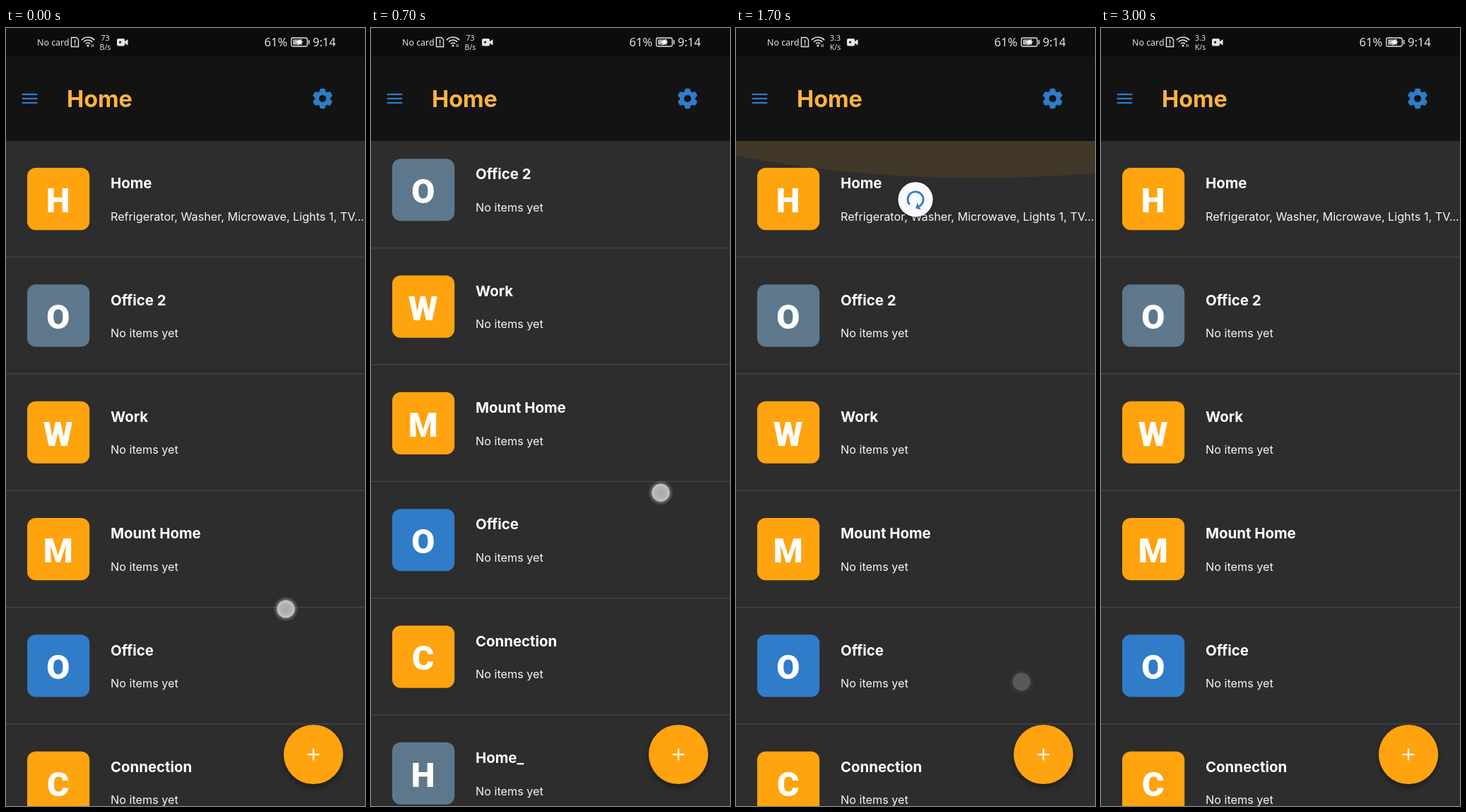
An HTML page with a canvas for the animation above (3100 ms loop, 508 by 1102 pixels).

```html
<!DOCTYPE html>
<html lang="en">
<head>
<meta charset="utf-8">
<title>Room list</title>
<style>
html, body { margin: 0; width: 100%; height: 100%; overflow: hidden; background: #2d2d2d; }
canvas { display: block; width: 508px; height: 1102px; }
</style>
</head>
<body>
<canvas id="stage"></canvas>
<script>
const W = 508, H = 1102, LOOP = 3100, STEP = 100;
const TOP = 160, ROW = 165.33, MAX_SCROLL = 215.3, TAU = Math.PI * 2;
const ORANGE = '#ffa30f', SLATE = '#5d788c', BLUE = '#307cc8', WHITE = '#e4e4e4';
const INTER = 'Inter, sans-serif', NOTO = '"Noto Sans", sans-serif', ROBOTO = 'Roboto, sans-serif';

const rooms = [
  ['Home', ORANGE, 'Refrigerator, Washer, Microwave, Lights 1, TV...'],
  ['Office 2', SLATE], ['Work', ORANGE], ['Mount Home', ORANGE],
  ['Office', BLUE], ['Connection', ORANGE], ['Home_', SLATE]
];

// Three swipes: up to the end, back to the start, then pull to refresh
const swipe = (start, end, from, to) => ({ start, end, from, to });
const up = swipe(0, 230, [396, 823], [456, 387]);
const down = swipe(640, 850, [404, 540], [425, 954]);
const pull = swipe(1250, 1565, [299, 483], [404, 926]);

const LAG = 30, SLOP = 22, FADE = 170;
const SNAP = 150, REFRESHED = 2760, SHRINK = 200;

const canvas = document.getElementById('stage');
const g = canvas.getContext('2d');
const dpr = window.devicePixelRatio || 1;
canvas.width = W * dpr;
canvas.height = H * dpr;

const clamp = (v, lo = 0, hi = 1) => Math.min(hi, Math.max(lo, v));
const mix = (a, b, p) => a + (b - a) * p;
const part = (t, start, end) => clamp((t - start) / (end - start));

const ease = p => {
  p = clamp(p);
  return p * p * (3 - 2 * p);
};

function finger(s, t) {
  const p = part(t, s.start, s.end);
  return s.from.map((v, i) => mix(v, s.to[i], p));
}

// The list follows the finger late, and only past the touch slop
function drag(s, t) {
  const moved = Math.abs(finger(s, t - LAG)[1] - s.from[1]);
  return Math.max(0, moved - SLOP);
}

const scrollAt = t =>
  clamp(Math.min(drag(up, t), MAX_SCROLL) - drag(down, t), 0, MAX_SCROLL);

function pullAt(t) {
  const f = Math.min(1.5, drag(pull, t) / 157);
  return t < pull.end ? f : mix(1.5, 1, part(t, pull.end, pull.end + SNAP));
}

function path(points) {
  g.beginPath();
  points.forEach(p => g.lineTo(...p));
}

function fill(color) {
  g.fillStyle = color;
  g.fill();
}

function stroke(width, color) {
  g.lineWidth = width;
  g.strokeStyle = color;
  g.stroke();
}

function text(s, x, y, font, color = '#fff', align = 'left') {
  g.font = font;
  g.fillStyle = color;
  g.textAlign = align;
  g.fillText(s, x, y);
}

function rect(x, y, w, h, color) {
  g.fillStyle = color;
  g.fillRect(x, y, w, h);
}

function box(x, y, w, h, r, color) {
  g.beginPath();
  g.roundRect(x, y, w, h, r);
  fill(color);
}

function disc(x, y, r, color) {
  g.beginPath();
  g.arc(x, y, r, 0, TAU);
  fill(color);
}

function arc(x, y, r, from, to, width, color) {
  g.beginPath();
  g.arc(x, y, r, from, to);
  stroke(width, color);
}

function shadow(color, blur, dy) {
  g.shadowColor = color;
  g.shadowBlur = blur * dpr;
  g.shadowOffsetY = dy * dpr;
}

function drawRoom([name, color, items = 'No items yet'], y) {
  box(30, y + 38, 88.2, 88.2, 12, color);
  text(name[0], 73.7, y + 101, `900 48px ${ROBOTO}`, '#fff', 'center');
  text(name, 148, y + 67.3, `700 20.4px ${INTER}`);
  text(items, 148, y + 112.8, `400 16.2px ${INTER}`, '#f6f6f6');
  rect(0, y + 163.9, W, 1.2, '#494949');
}

// Overscroll glow: swells quickly, then recedes
function drawGlow(s, t, start, length, bottom) {
  const p = (t - start) / length;
  if (p <= 0 || p >= 1) return;
  const r = W * 1.5, h = W * .2677;
  const x = W / 4 + finger(s, t)[0] / 2 + 14;
  const size = .46 * (1 - p) * Math.min(1, .6 + p * 3);
  g.save();
  g.translate(0, bottom ? H : TOP);
  g.scale(1, bottom ? -size : size);
  g.beginPath();
  g.rect(0, 0, W, h);
  g.clip();
  g.globalAlpha = .12 * (1 - p) * Math.min(1, p * 6) ** 2;
  disc(x, h - r, r, ORANGE);
  g.restore();
}

function drawArrow(f) {
  const r = 11;
  g.globalAlpha = clamp(f);
  g.rotate(.2 + 9 * (f - .95));
  arc(0, 0, r, -4.95 * clamp(f), 0, 2.8, BLUE);
  path([[r - 5.5, 0], [r + 5.5, 0], [r, 5.5]]);
  fill(BLUE);
}

function drawSpinner(t) {
  const dt = t - 2380, cycle = Math.floor(dt / 1333), p = dt / 1333 - cycle;
  const head = ease(p * 2), tail = ease(p * 2 - 1), span = TAU * .75;
  const start = Math.PI - .1 + TAU * dt / 2222 + span * (cycle + tail);
  arc(0, 0, 11, start, start + Math.max(.26, span * (head - tail)), 2.8, BLUE);
}

function drawPull(t) {
  const f = pullAt(t), scale = 1 - part(t, REFRESHED, REFRESHED + SHRINK);
  if (f <= 0 || scale <= 0) return;
  g.save();
  g.translate(254, TOP - 29.5 + 107 * f);
  g.scale(scale, scale);
  shadow('rgba(0,0,0,.35)', 4, 1.5);
  disc(0, 0, 24.6, '#fbf9fc');
  shadow('transparent', 0, 0);
  if (t < pull.end + SNAP) drawArrow(f);
  else drawSpinner(t);
  g.restore();
}

function drawGear(x, y) {
  g.save();
  g.translate(x, y);
  g.lineJoin = 'round';
  for (let i = 0; i < 6; i++) {
    path([[-4.6, -8], [-2.7, -13.6], [2.7, -13.6], [4.6, -8]]);
    g.closePath();
    fill(BLUE);
    stroke(1.4, BLUE);
    g.rotate(TAU / 6);
  }
  disc(0, 0, 10.7, BLUE);
  disc(0, 0, 5.1, '#131313');
  g.restore();
}

function drawStatus(t) {
  text('No card', 44, 25, `400 12.4px ${NOTO}`, WHITE);

  path([[92.5, 13.5], [99.5, 13.5], [102.5, 16.5], [102.5, 26.5], [92.5, 26.5]]);
  g.closePath();
  stroke(1.4, WHITE);
  rect(96.8, 16.5, 1.5, 5, WHITE);
  rect(96.8, 22.8, 1.5, 1.6, WHITE);

  for (let r = 4; r <= 12; r += 4) arc(116, 25, r, -Math.PI * .77, -Math.PI * .23, 1.7, WHITE);
  disc(116, 25, 1.6, WHITE);
  rect(120.5, 23, 1.2, 4, '#aaa');
  rect(122.7, 23, 1.2, 4, '#aaa');

  const speed = t < 1000 ? ['73', 'B/s'] : ['3.3', 'K/s'];
  speed.forEach((s, i) => text(s, 140.5, 18 + 13 * i, `400 10.5px ${NOTO}`, WHITE, 'center'));

  box(157, 15, 11, 10.5, 2, WHITE);
  path([[168, 19], [172.5, 16], [172.5, 24.5], [168, 21.5]]);
  fill(WHITE);
  disc(161.5, 20, 1.6, '#0c0c0c');

  text('61%', 365.5, 26, `400 16.5px ${NOTO}`, WHITE);
  g.beginPath();
  g.roundRect(403.7, 14, 22.6, 12, 2.5);
  stroke(1.3, WHITE);
  box(406, 16.2, 13, 7.6, 1, '#aaa');
  rect(427.8, 17, 1.6, 6, WHITE);
  path([[418, 15.5], [409, 20.8], [414, 20.8], [412, 24.8], [421, 19.3], [416, 19.3]]);
  fill('#fff');
  text('9:14', 434, 26, `400 16.5px ${NOTO}`, WHITE);
}

function drawHeader(t) {
  rect(0, 0, W, TOP, '#131313');
  rect(0, 0, W, 40, '#0c0c0c');
  drawStatus(t);
  for (let y = 94; y <= 106; y += 6) rect(22.7, y - 1.1, 21.6, 2.2, BLUE);
  text('Home', 86, 112, `700 32.4px ${INTER}`, '#ffb340');
  drawGear(448, 100);
}

function drawButton() {
  shadow('rgba(0,0,0,.4)', 9, 4);
  disc(435, 1029, 42.1, ORANGE);
  shadow('transparent', 0, 0);
  rect(426.6, 1027.9, 16.8, 2.3, '#fff');
  rect(433.9, 1020.6, 2.3, 16.8, '#fff');
}

function drawTouch(s, t) {
  const alpha = t < s.start ? 0 : 1 - part(t, s.end, s.end + FADE);
  if (!alpha) return;
  const [x, y] = finger(s, t);
  g.globalAlpha = alpha;
  const halo = g.createRadialGradient(x, y, 11, x, y, 18);
  halo.addColorStop(0, 'rgba(165,165,180,.75)');
  halo.addColorStop(.5, 'rgba(140,140,158,.4)');
  halo.addColorStop(1, 'rgba(120,120,140,0)');
  disc(x, y, 18, halo);
  const core = g.createRadialGradient(x, y, 0, x, y, 12.5);
  core.addColorStop(0, '#a8a8a8');
  core.addColorStop(.65, '#b2b3b3');
  core.addColorStop(1, '#c8caca');
  disc(x, y, 12.5, core);
  g.globalAlpha = 1;
}

function draw(t) {
  g.setTransform(dpr, 0, 0, dpr, 0, 0);
  const scroll = scrollAt(t);

  rect(0, 0, W, H, '#2d2d2d');
  g.save();
  g.beginPath();
  g.rect(0, TOP, W, H - TOP);
  g.clip();
  rooms.forEach((room, i) => drawRoom(room, TOP + i * ROW - scroll));
  drawGlow(up, t, 170, 400, true);
  drawGlow(down, t, 810, 450, false);
  drawGlow(pull, t, 1570, 800, false);
  drawPull(t);
  g.restore();

  drawHeader(t);
  drawButton();
  [up, down, pull].forEach(s => drawTouch(s, t));
}

const begin = performance.now();
function tick() {
  const t = (performance.now() - begin) % LOOP;
  draw(Math.floor(t / STEP) * STEP);
  requestAnimationFrame(tick);
}
tick();
</script>
</body>
</html>
```
